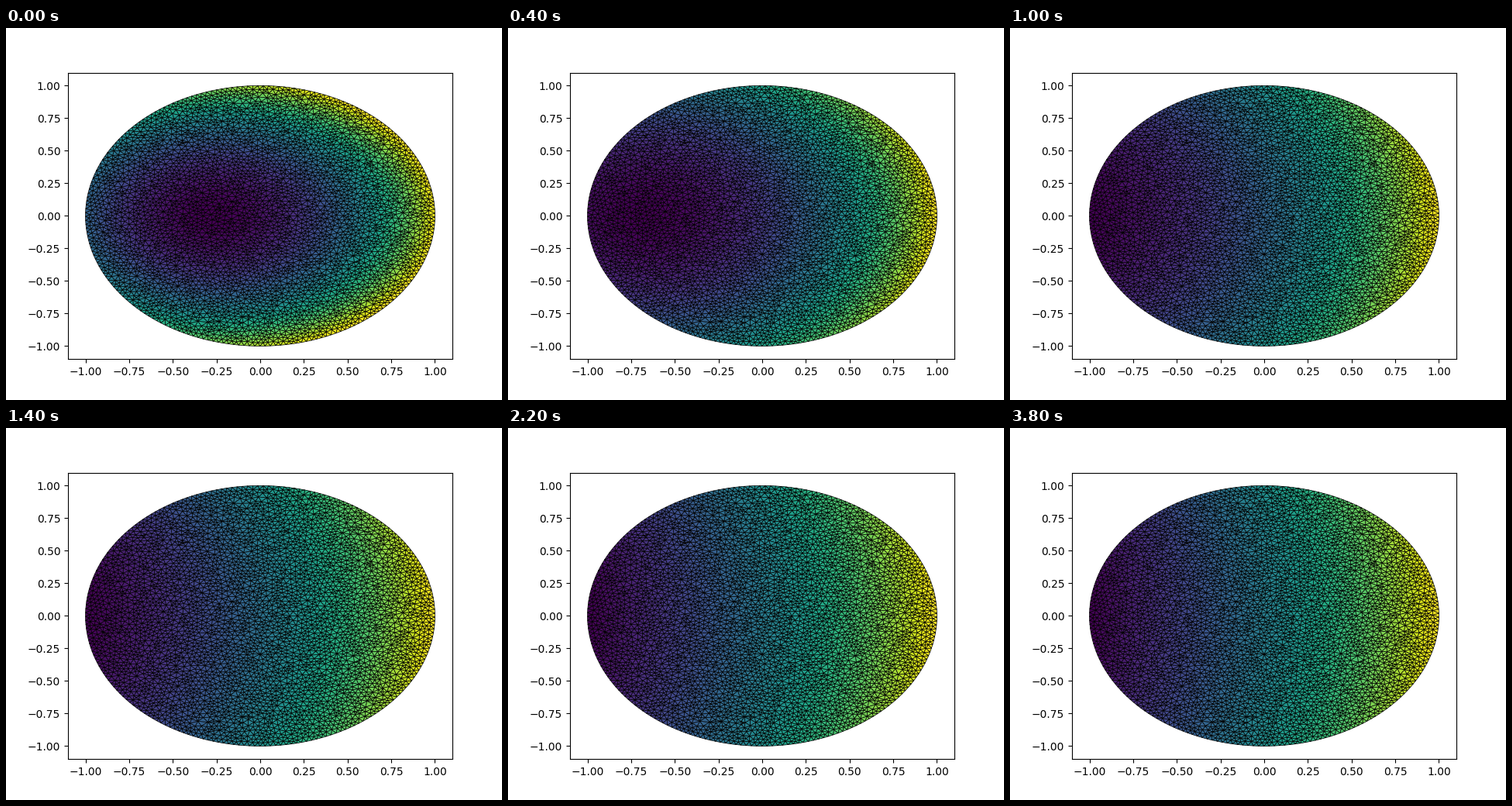
These frames come from a looping animation (640 px wide and 480 px high, 4 s). A matplotlib script:

```python
import numpy as np
import matplotlib.pyplot as plt
from matplotlib.animation import FuncAnimation
from matplotlib.tri import Triangulation

FRAMES, STEP_MS = 20, 200
H = 0.03  # mean edge length


def disk_mesh(h, smoothing=3):
    """Unstructured triangulation of the unit disk."""
    rng = np.random.default_rng(4)
    rings = round(1 / (0.866 * h))
    radii, angles = [np.zeros(1)], [np.zeros(1)]
    for k in range(1, rings + 1):
        r = k / rings
        n = max(6, round(2 * np.pi * r / h))
        radii.append(np.full(n, r))
        angles.append(rng.random() * 2 * np.pi / n + np.arange(n) * 2 * np.pi / n)
    r, a = np.concatenate(radii), np.concatenate(angles)
    pts = np.column_stack([r * np.cos(a), r * np.sin(a)])
    inner = r < 1 - h / 2
    spread = np.where(r < 1 - 1.5 * h, 0.6, 0.15) * h
    pts += rng.uniform(-1, 1, pts.shape) * (spread * inner)[:, None]

    for _ in range(smoothing):
        i, j = Triangulation(*pts.T).edges.T
        total, count = np.zeros_like(pts), np.zeros(len(pts))
        for p, q in ((i, j), (j, i)):
            np.add.at(total, p, pts[q])
            np.add.at(count, p, 1)
        mean = total / count[:, None]
        pts[inner] += 0.6 * (mean - pts)[inner]
    return Triangulation(*pts.T)


mesh = disk_mesh(H)


def field(t):
    """Diffusing field on the triangles, scaled to 0..1."""
    x, y = mesh.x, mesh.y
    radial = 0.16 + 1.2 * np.exp(-1.75 * t) + 0.84 * np.exp(-9 * t)
    saddle = -0.36 * np.exp(-4.5 * t)
    u = x + radial * (x**2 + y**2) + saddle * (x**2 - y**2)
    u = u[mesh.triangles].mean(axis=1)
    return (u - u.min()) / np.ptp(u)


fig, ax = plt.subplots(figsize=(6.4, 4.8), dpi=100)
surface = ax.tripcolor(mesh, facecolors=field(0), edgecolors="k",
                       linewidth=0.5, cmap="viridis", vmin=0, vmax=1)


def update(i):
    surface.set_array(field(i * STEP_MS / 1000))
    return (surface,)


anim = FuncAnimation(fig, update, frames=FRAMES, interval=STEP_MS,
                     repeat=True, repeat_delay=0)
plt.show()
```
